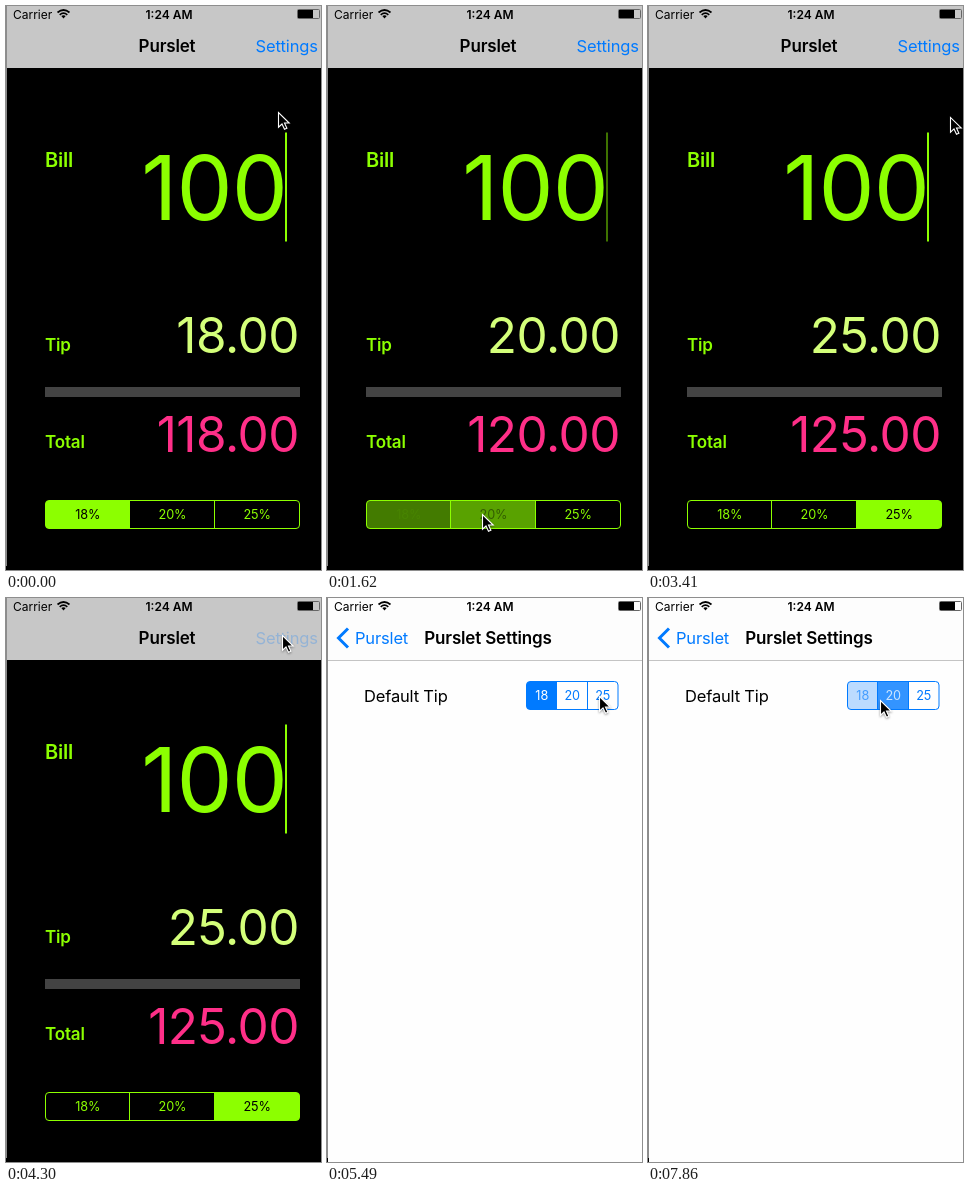
Animation of 315x564 px, one loop 8000 ms. Source, as an HTML page:

```html
<!DOCTYPE html>
<html lang="en">
<head>
<meta charset="utf-8">
<title>Tip calculator</title>
<style>
html, body { margin: 0; width: 100%; height: 100%; overflow: hidden; background: #000; }
svg { display: block; width: 315px; height: 564px; }
text { font: 400 16.5px Inter, "Open Sans", sans-serif; letter-spacing: -.01em; }
.b { font-weight: 600; font-size: 17px; }
.m { text-anchor: middle; }
.s { font-size: 12px; letter-spacing: 0; }
.seg { font-size: 12.7px; }
.num { font-size: 49.5px; text-anchor: end; }
.link { fill: #007aff; }
</style>
</head>
<body>
<svg viewBox="0 0 315 564">
  <rect width="315" height="564"/>
  <g id="main">
    <g fill="#8cff00">
      <text class="b" x="39" y="160.5" style="font-size:20px">Bill</text>
      <text class="b" x="39" y="344.5">Tip</text>
      <text class="b" x="39" y="441.5">Total</text>
      <text class="num" x="281" y="213.5" style="font-size:89px">100</text>
      <rect id="caret" x="279" y="126.5" width="2" height="109"/>
    </g>
    <text class="num" id="tip" x="293" y="347" fill="#d4ff7a"></text>
    <rect x="39" y="381" width="255" height="10" fill="#434343"/>
    <text class="num" id="total" x="293" y="446" fill="#ff2f88"></text>
    <g id="rates"></g>
  </g>
  <g id="mainBar">
    <rect width="315" height="62" fill="#c7c7c7"/>
    <text class="b m" x="161" y="46">Purslet</text>
    <text class="link" id="open" x="249.5" y="46">Settings</text>
  </g>
  <g id="prefs">
    <g id="page">
      <rect x="1" y="62" width="320" height="502" fill="#fefefe"/>
      <text x="37" y="103.5">Default Tip</text>
      <g id="defaults"></g>
    </g>
    <rect width="315" height="62" fill="#fdfdfd"/>
    <path id="tail" d="M0 0H34L38 62H0Z" fill="#f0f0f0"/>
    <rect y="62" width="315" height="1" fill="#c4c4c4"/>
    <path d="M21 30.5L11.5 40L21 49.5" fill="none" stroke="#007aff" stroke-width="3"/>
    <text class="link" x="28" y="46">Purslet</text>
    <text class="b m" x="161" y="46">Purslet Settings</text>
  </g>
  <g fill="none" stroke="#000" stroke-width="1.7">
    <text class="s" x="7" y="12.5" fill="#000" stroke="none">Carrier</text>
    <text class="s b m" x="163" y="12.5" fill="#000" stroke="none">1:24 AM</text>
    <path d="M51.5 6.5Q57.5 1.5 63.5 6.5M53.7 8.8Q57.5 5.6 61.3 8.8"/>
    <path d="M55.3 10L57.5 12.5L59.7 10Q57.5 8.5 55.3 10Z" fill="#000" stroke="none"/>
    <rect x="291.5" y="3.5" width="22" height="9" rx="1" stroke-width="1" stroke="#666"/>
    <rect x="292" y="4" width="15" height="8" fill="#000" stroke="none"/>
  </g>
  <rect width="1" height="560" fill="#8c8c8c"/>
  <path id="cursor" d="M.5 .5V15.2L4 12L6.500 17.300L8.900 16.200L6.500 11H11.200Z" stroke="#fff" stroke-width="1.1"
    style="filter:drop-shadow(0 1px 1px #0006)"/>
</svg>
<script>
const $ = id => document.getElementById(id);
const clamp = v => Math.max(0, Math.min(1, v));
const LOOP = 8000, STEP = 148.4;
const PUSH = 4740;

// Pointer moves: start, end, x, y
const MOVES = [
  [600, 1200, 150, 530], [1200, 1480, 155, 508], [1780, 2220, 238, 507],
  [2680, 3410, 302, 111], [3410, 3710, 291, 19], [3710, 4000, 276, 37],
  [5050, 5490, 272, 98], [6660, 6670, 192, 97], [6670, 7270, 232, 102]
];

// Taps: time, segment
const RATE_TAPS = [[1480, 1], [2370, 2]];
const DEFAULT_TAPS = [[7680, 1]];
const RATES = [18, 20, 25];

function pointer(t) {
  let x = 272, y = 106;
  for (const [from, to, u, v] of MOVES) {
    const k = clamp((t - from) / (to - from)), e = k * k * (3 - 2 * k);
    x += (u - x) * e;
    y += (v - y) * e;
  }
  return [x, y];
}

const fade = (t, at) => clamp((t - at - 75) / 150);

// Fill strength of each segment: a light press, then a crossfade
function levels(t, taps) {
  let fill = [1, 0, 0];
  for (const [at, pick] of taps) {
    if (t < at) break;
    const k = fade(t, at);
    fill = fill.map((a, i) => i === pick ? .25 + .75 * k : a * (1 - k));
  }
  return fill;
}

function caretAlpha(t) {
  const p = Math.min(t, 4310) % 1000;
  return p < 800 ? clamp((700 - p) / 150) : clamp((p - 900) / 100);
}

function segments(id, x, y, w, h, labels, tint, back) {
  const cell = w / 3, g = $(id), edge = i => Math.round(x + cell * i);
  const box = `x="${x}" y="${y}" width="${w}" height="${h}" rx="3.5"`;
  g.innerHTML = `<clipPath id="${id}Clip"><rect ${box}/></clipPath>
    <g clip-path="url(#${id}Clip)">${labels.map((_, i) =>
      `<rect class="cell" x="${edge(i) - 1}" y="${y}" width="${edge(i + 1) - edge(i) + 1}" height="${h}" fill="${tint}"/>`).join("")}</g>
    <rect ${box} fill="none" stroke="${tint}"/>
    <path d="${[1, 2].map(i => `M${edge(i) - .5} ${y}v${h}`).join("")}" stroke="${tint}"/>
    ${labels.map((s, i) => `<text class="seg m" x="${x + cell * (i + .5)}" y="${y + 18.7}">${s}</text>`).join("")}`;
  const cells = g.querySelectorAll(".cell"), texts = g.querySelectorAll("text");
  return fill => fill.forEach((a, i) => {
    cells[i].style.fillOpacity = a;
    texts[i].style.fill = `color-mix(in srgb, ${back} ${a * 100}%, ${tint})`;
  });
}

const setRates = segments("rates", 39.5, 494.5, 254, 28, RATES.map(r => r + "%"), "#8cff00", "#000000");
const setDefaults = segments("defaults", 199.5, 83.5, 91.5, 28, RATES, "#007aff", "#ffffff");

const show = (id, on) => $(id).style.display = on ? "" : "none";
const place = (id, x, y = 0) => $(id).setAttribute("transform", `translate(${x} ${y})`);

function draw(t) {
  const tip = RATES[RATE_TAPS.filter(([at]) => fade(t, at) > 0).length];
  const pushed = t >= PUSH, sliding = pushed && t < PUSH + 150;
  $("tip").textContent = tip.toFixed(2);
  $("total").textContent = (100 + tip).toFixed(2);
  $("caret").style.opacity = caretAlpha(t);
  $("open").style.opacity = 1 - .75 * clamp((t - 4010) / 290);
  setRates(levels(t, RATE_TAPS));
  setDefaults(levels(t, DEFAULT_TAPS));
  place("main", pushed ? -90 : 0);
  place("page", sliding ? 5 : 0);
  show("mainBar", !pushed);
  show("prefs", pushed);
  show("tail", sliding);
  place("cursor", ...pointer(t));
}

function tick() {
  const t = performance.now() % LOOP;
  draw(Math.floor((t + 15) / (STEP + .1)) * STEP);
  requestAnimationFrame(tick);
}
tick();
</script>
</body>
</html>
```
